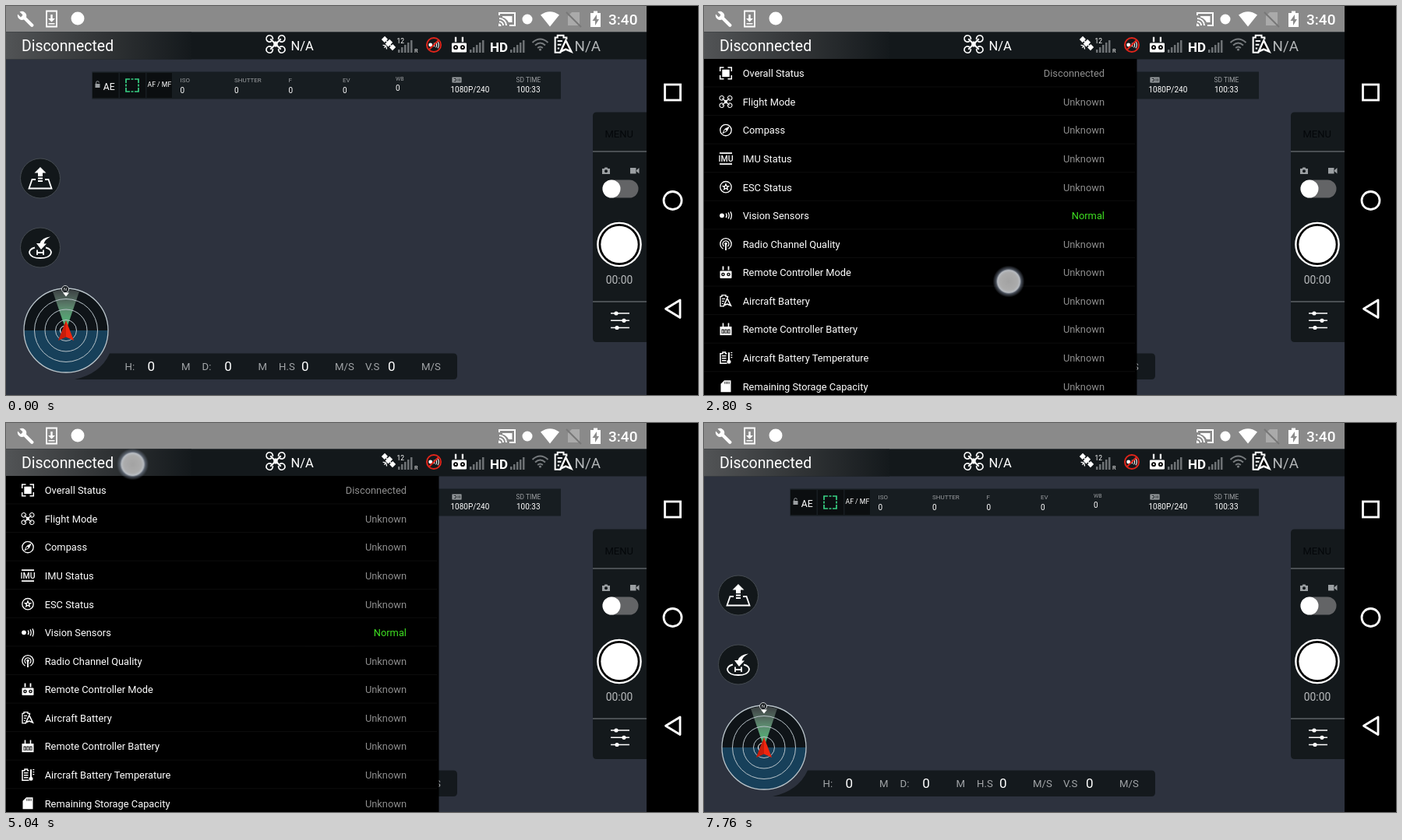
Animation of 888x500 px, one loop 8 s. Source, as an HTML page:

```html
<!DOCTYPE html>
<html lang="en">
<head>
<meta charset="utf-8">
<title>Flight status checklist</title>
<style>
html, body { margin: 0; width: 100%; height: 100%; overflow: hidden; background: #000; }
svg { display: block; width: 100vw; height: 100vh; font-family: Roboto, "Noto Sans", sans-serif; }
.s { fill: none; stroke: #fff; }
.w { fill: #fff; }
.g { fill: #9b9fa2; }
.k { fill: #000; }
.lab { font-size: 8px; fill: #9a9da0; }
.val { font-size: 10px; fill: #fff; }
.unit { font-size: 13.2px; fill: #a3a6a9; }
.num { font-size: 17px; fill: #fff; }
.row { font-size: 12.85px; fill: #fff; }
.state { text-anchor: end; fill: #8e8e8e; }
.ok { fill: #3fe022; }

/* 1% of the loop is 80 ms */
#list, #settings, #scroll, #touch, #dot { animation: 8s step-end infinite; }
#list { animation-name: list; }
#settings { animation-name: settings; }
#scroll { animation-name: scroll; }
#touch { animation-name: move; }
#dot { animation-name: press; }

@keyframes list { 0%, 65%, 100% { opacity: 0 } 18% { opacity: 1 } }
@keyframes settings { 0%, 96%, 100% { opacity: 0 } 79% { opacity: 1 } }
@keyframes scroll {
  0%, 35% { transform: translateY(0) }
  36% { transform: translateY(-12px) }
  37%, 49% { transform: translateY(-43px) }
  50% { transform: translateY(-31.5px) }
  51%, 100% { transform: translateY(0) }
}
@keyframes move {
  0% { transform: translate(152.5px, 56px) }
  35% { transform: translate(391px, 354px) }
  36% { transform: translate(392px, 330px); animation-timing-function: steps(4) }
  40% { transform: translate(398px, 65px) }
  49% { transform: translate(395px, 266px) }
  50% { transform: translate(397px, 288px); animation-timing-function: steps(4) }
  54% { transform: translate(402px, 440px) }
  63% { transform: translate(162.5px, 53px) }
  77%, 100% { transform: translate(790px, 171px) }
}
@keyframes press {
  0%, 20%, 42%, 56%, 66%, 80%, 97%, 100% { opacity: 0 }
  16%, 35%, 49%, 63%, 77%, 94% { opacity: 1 }
  18%, 40%, 54%, 65%, 79%, 96% { opacity: .76 }
  19%, 41%, 55% { opacity: .35 }
}
</style>
</head>
<body>
<svg viewBox="0 0 888 500" stroke-width="1.3">
<defs>
  <linearGradient id="head">
    <stop offset="0" stop-color="#525456"/><stop offset=".5" stop-color="#323537"/><stop offset="1" stop-color="#14191c"/>
  </linearGradient>
  <linearGradient id="beam" x1="0" y1="0" x2="0" y2="1">
    <stop offset="0" stop-color="#8b9390" stop-opacity=".35"/>
    <stop offset=".45" stop-color="#6fa583" stop-opacity=".8"/>
    <stop offset="1" stop-color="#49c878"/>
  </linearGradient>
  <radialGradient id="spot">
    <stop offset="0" stop-color="#a9a9a9" stop-opacity=".96"/>
    <stop offset=".55" stop-color="#b2b2b2" stop-opacity=".96"/>
    <stop offset=".7" stop-color="#c6cad0" stop-opacity=".92"/>
    <stop offset=".79" stop-color="#808b9e" stop-opacity=".55"/>
    <stop offset="1" stop-color="#808b9e" stop-opacity="0"/>
  </radialGradient>
  <clipPath id="view"><path d="M0 68H555.500V500H0Z"/></clipPath>

  <!-- icons on a 16 px box around the origin -->
  <g id="overall"><path class="s" stroke-width="1.500" d="M-7.300-2.500V-7.300H-2.500M2.500-7.300H7.300V-2.500M7.300 2.500V7.300H2.500M-2.500 7.300H-7.300V2.500"/><rect class="w" x="-4.700" y="-4.700" width="9.400" height="9.400"/></g>
  <g id="drone">
    <path class="s" d="M-4.500-4.500L4.500 4.500M4.500-4.500L-4.500 4.500"/>
    <path class="s" stroke-width="1.100" d="M-3.500-2.500A2.800 2.800 0 1 1-2.500-4M3.500-2.500A2.800 2.800 0 1 0 2.500-4M-3.500 2.500A2.800 2.800 0 1 0-2.500 4M3.500 2.500A2.800 2.800 0 1 1 2.500 4"/>
    <rect class="w" x="-1.800" y="-2.300" width="3.600" height="4.600" rx="1.500"/>
  </g>
  <g id="compass"><circle class="s" r="7.200"/><path class="s" stroke-width="1" d="M4-4L1.300 1.300L-4 4L-1.300-1.300Z"/><path class="w" d="M4-4L1.300 1.300L-1.300-1.300Z"/></g>
  <g id="imu"><path class="s" stroke-width="1.700" d="M-8-7H8M-8 7H8"/><text class="w" y="3.800" font-size="10.500" font-weight="500" text-anchor="middle">IMU</text></g>
  <g id="esc"><circle class="s" r="7.200"/><path class="w" d="M0-5.500L1.500-1.800L5.300-1.700L2.300.7L3.300 4.500L0 2.300L-3.300 4.500L-2.300.7L-5.300-1.700L-1.500-1.800Z"/><circle class="k" r="1.200"/></g>
  <g id="vision"><circle class="w" cx="-5" r="2.900"/><path class="s" d="M.2-2.800Q2 0 .2 2.800M3-4Q5.500 0 3 4M5.900-5Q8.900 0 5.900 5"/></g>
  <g id="radio"><path class="s" d="M-3.500 6.300A7.200 7.200 0 1 1 3.500 6.300M-2.300 3.200A4 4 0 1 1 2.300 3.200"/><path class="s" stroke-width="1.800" d="M0-1V8"/><circle class="w" r="1.700" cy="-.5"/></g>
  <g id="rc"><path class="s" stroke-width="1.800" d="M-3.500-8V-3M3.500-8V-3"/><rect class="w" x="-7.500" y="-2" width="15" height="9.500" rx="1"/><circle class="k" cx="-3.500" cy="2.500" r="2.300"/><circle class="k" cx="3.500" cy="2.500" r="2.300"/><circle class="w" cx="-3.500" cy="2.500" r=".9"/><circle class="w" cx="3.500" cy="2.500" r=".9"/></g>
  <g id="pack"><path class="s" d="M-2 6.800H-7V-5.700H-5V-7.400H0V-5.700H2.500V-4M-5-2.700H-1M-5 .3H-2M-5 3.300H-3.500"/><path class="w" d="M1.800-5L8 7.500L1.800 5L-4 7.500Z"/><path class="k" d="M1.800-1.500L4.800 4.500L1.800 3.200L-.8 4.300Z"/></g>
  <g id="rcpack"><path class="s" stroke-width="1.600" d="M-3.500-8V-3M3.500-8V-3"/><path class="w" d="M-7.500-3.500H7.500V7.500H-7.500Z"/><path class="k" d="M-5.500 0H-2.300V5.500H-5.500ZM-1.500 0H1.500V5.500H-1.500ZM2.300 0H5.500V5.500H2.300Z"/><path class="s" d="M-4 1V5M0 1V5M4 1V5"/></g>
  <g id="temp"><path class="s" stroke-width="1.500" d="M1.500-5.500H-.5V-7.200H-4V-5.500H-7V7H1.500M-5-2.500H.5M-5 .5H.5M-5 3.500H.5"/><path class="s" stroke-width="2" d="M4-7V4"/><path class="s" d="M6.300-6.500H8.300M6.300-3.500H8.300M6.300-.5H8.300"/><circle class="w" cx="4" cy="5" r="2.500"/></g>
  <g id="card"><path class="w" d="M-2-7.500H6.500V7.500H-6.500V-3Z"/><path class="s" style="stroke:#000" stroke-width="1" d="M-1-6V-3M1.500-6V-3M4-6V-3"/></g>
  <g id="gimbal"><path class="s" stroke-width="1.800" d="M-7-7H7"/><rect class="w" x="-6.500" y="-4.500" width="13" height="12" rx="1"/><circle class="k" cy="2" r="4"/><circle class="w" cy="2" r="2"/></g>
  <path id="bars" fill="#6d7174" d="M0 0V-4H2.500V0ZM4 0V-7H6.500V0ZM8 0V-10H10.500V0ZM12 0V-13H14.500V0ZM16 0V-16H18.500V0Z"/>
</defs>

<rect width="888" height="500"/>
<rect width="822" height="500" fill="#2d323e"/>

<!-- system bar -->
<rect width="822" height="33.500" fill="#8a8a8a"/>
<path class="w" d="M35 23.500L26 14.500A6 6 0 0 0 17.500 7.500L21.500 11.500L19 14.500L15 10.500A6 6 0 0 0 23 17.500L32 26.500Q33.500 27.500 35 26Q36.300 24.700 35 23.500Z"/>
<path class="s" stroke-width="1.800" d="M52 6.500H65V26.500H52Z"/>
<path class="w" d="M57.300 11H59.700V16H63L58.500 20.500L54 16H57.300ZM54.500 22H62.500V23.500H54.500Z"/>
<circle class="w" cx="92" cy="16" r="8.500"/>
<path class="s" stroke-width="2" d="M633 12V9H653V25H646M633 16A9 9 0 0 1 642 25M633 20A5 5 0 0 1 638 25"/>
<path class="w" d="M632 22.500A3.500 3.500 0 0 1 635.500 26H632ZM637 13H649.500V21H645Q642 15.500 637 14.500Z"/>
<circle class="w" cx="669" cy="17" r="6.500"/>
<path class="w" d="M686 11.500Q698 3 710 11.500L698 26.500Z"/>
<path fill="#aaa" d="M726 8H736V25H721V13Z"/>
<path d="M719 8L738 27" stroke="#777" stroke-width="2"/>
<path class="w" d="M750 9H754V6.500H759V9H763V27H750Z"/>
<path fill="#8a8a8a" d="M758 11L752.500 19H756V25L761 17H758Z"/>
<text class="w" x="773" y="23.800" font-size="19" font-weight="500">3:40</text>

<!-- aircraft bar -->
<rect y="33.500" width="822" height="35" fill="#13181b"/>
<rect y="33.500" width="238" height="35" fill="url(#head)"/>
<text class="w" x="20" y="58.300" font-size="19.400">Disconnected</text>
<use href="#drone" transform="translate(346 49) scale(1.500)"/>
<text class="w" x="365.500" y="57.300" font-size="16.500">N/A</text>
<g transform="translate(491 48) rotate(45)">
  <path class="w" d="M-10-3H-4.500V3H-10ZM4.500-3H10V3H4.500ZM-2.800-4.500H2.800V3.500H-2.800Z"/>
  <path class="s" d="M-5 0H5M-3.500 7Q0 3.500 3.500 7M0 4V8"/>
</g>
<text class="w" x="501.500" y="47.500" font-size="8.500">12</text>
<use href="#bars" x="503" y="60"/>
<text class="w" x="524" y="60" font-size="7.500">R</text>
<use href="#vision" transform="translate(549 50) scale(.850)"/>
<circle cx="549" cy="50" r="9" fill="none" stroke="#e0251b" stroke-width="2"/>
<path d="M555.500 43.500L542.500 56.500" stroke="#e0251b" stroke-width="2"/>
<use href="#rc" transform="translate(581.500 50) scale(1.270)"/>
<use href="#bars" x="595" y="60"/>
<text class="w" x="621" y="59.200" font-size="17" font-weight="700">HD</text>
<use href="#bars" x="647" y="60"/>
<g fill="none" stroke="#777b7e" stroke-width="2"><path d="M675.500 47Q685.500 38 695.500 47M679 50.500Q685.500 44.500 692 50.500M682.200 54Q685.500 51 688.800 54"/></g>
<circle cx="685.500" cy="56" r="1.600" fill="#777b7e"/>
<use href="#pack" transform="translate(715.500 49.300) scale(1.550)"/>
<text x="729.500" y="58" font-size="18.800" fill="#b4b7b9">N/A</text>

<!-- camera readings -->
<rect x="110.500" y="84.500" width="601.500" height="35" fill="#171d21"/>
<path fill="#0b0e10" d="M111 86H144.500V118H111ZM146 86H179V118H146ZM180.500 86H213V118H180.500Z"/>
<path class="g" d="M114.500 100H120.500V105H114.500Z"/><path d="M115.700 100V98.500A1.800 1.800 0 0 1 119.300 98.500" fill="none" stroke="#9b9fa2" stroke-width="1"/>
<text class="w" x="124.800" y="108.300" font-size="12.200">AE</text>
<path d="M154 99V94H159M165 94H170V99M170 105V110H165M159 110H154V105M160.500 94H163.500M160.500 110H163.500M154 100.500V103.500M170 100.500V103.500" fill="none" stroke="#38cf83" stroke-width="1.700"/>
<text class="w" x="181.500" y="104.200" font-size="8.700">AF / MF</text>
<g class="lab">
  <text x="223.500" y="98">ISO</text><text x="293" y="98">SHUTTER</text><text x="362.500" y="98">F</text>
  <text x="432" y="98">EV</text><text x="500" y="96.300" font-size="7">WB</text><text x="654.500" y="98" font-size="8.400">SD TIME</text>
</g>
<g class="val">
  <text x="223.500" y="112">0</text><text x="293" y="112">0</text><text x="362.500" y="112">0</text>
  <text x="432" y="112">0</text><text x="500" y="109">0</text>
  <text x="570.500" y="111.300">1080P/240</text><text x="655" y="111.300">100:33</text>
</g>
<rect class="g" x="572.500" y="91.500" width="12" height="7"/>
<path d="M574.500 93.500H577.500V96.500H574.500M580 93V97M582.300 93V97" fill="none" stroke="#22282c" stroke-width="1"/>

<!-- flight buttons -->
<g fill="#12171a" stroke="#454b51" stroke-width="1"><circle cx="44" cy="221.500" r="25.500"/><circle cx="44" cy="310.500" r="25.500"/></g>
<path class="w" d="M44 207L51.500 214.500H47V219H41V214.500H36.500ZM41 220.500H47V222.500H41ZM41 224H47V226H41Z"/>
<path class="s" stroke-width="1.800" d="M38 223H33.500L29.500 234.500H58.500L54.500 223H50"/>
<path class="w" d="M57 296.500Q46 297.500 43.500 305H39L45 313L52 305.500H48.500Q50 300 57 296.500Z"/>
<path class="s" stroke-width="1.800" d="M37 310.500C26 313 28 324 44 324S62 313 51 310.500M40 313.500V320M48 313.500V320M40 317H48"/>

<!-- telemetry -->
<path fill="#14191d" d="M133 446.500H574Q579 446.500 579 451.500V475Q579 480 574 480H88Q121 473 133 446.500Z"/>
<g class="unit">
  <text x="152.500" y="468">H:</text><text x="225" y="468">M</text><text x="251.500" y="468">D:</text><text x="323.500" y="468">M</text>
  <text x="350" y="468">H.S</text><text x="422" y="468">M/S</text><text x="461" y="468">V.S</text><text x="533" y="468">M/S</text>
</g>
<g class="num"><text x="181.500" y="468.500">0</text><text x="280.300" y="468.500">0</text><text x="379" y="468.500">0</text><text x="490" y="468.500">0</text></g>

<!-- radar -->
<g transform="translate(77 417)" stroke-width="1">
  <circle r="54" fill="#0f1418"/>
  <path fill="#17405a" d="M-54 0A54 54 0 0 0 54 0Z"/>
  <path fill="url(#beam)" d="M0 0L-17-50Q0-55 17-50Z"/>
  <g fill="none" stroke="#b9c4ca"><circle r="13.500"/><circle r="27"/><circle r="40.500"/><circle r="54" stroke-width="1.300"/></g>
  <circle class="s" cx="-2" r="5.500"/>
  <path fill="#f0260f" d="M0-13L10 13L0 8.500Z"/><path fill="#c81d0b" d="M0-13L-10 13L0 8.500Z"/>
  <circle cx="-1" cy="-53" r="4.500" fill="#14191d" stroke="#d0d4d6"/>
  <text class="w" x="-1" y="-51" font-size="5.500" text-anchor="middle">N</text>
  <path class="w" d="M-4-48.500H4L0-43.500Z"/>
</g>

<!-- camera controls -->
<path fill="#14191c" d="M822 136.500H758Q753 136.500 753 141.500V427Q753 432 758 432H822Z"/>
<path d="M753 187H822M753 380H822" stroke="#5c6165" stroke-width="1.600"/>
<text x="768.500" y="168.800" font-size="13" fill="#04070a">MENU</text>
<path class="g" d="M765 209H767.500L768.500 207.500H771.500L772.500 209H775V216H765ZM801 208H808.500V215.500H801ZM809 211L812.500 208V215.500L809 212.500Z"/>
<circle cx="770" cy="212.300" r="2" fill="#14191c"/>
<rect x="765.500" y="223.500" width="46" height="23" rx="11.500" fill="#636466"/>
<circle class="w" cx="777" cy="235" r="11.500"/>
<circle cx="787" cy="306.500" r="27.600" fill="#000" stroke="#fff" stroke-width="2.400"/>
<circle class="w" cx="787" cy="306.500" r="23.700"/>
<text x="769.800" y="357" font-size="13.800" fill="#b9bbbd">00:00</text>
<path class="s" stroke-width="1.600" d="M776 395H800M776 404.300H800M776 413.500H800"/>
<g class="w"><circle cx="783" cy="395" r="2.600"/><circle cx="793" cy="404.300" r="2.600"/><circle cx="784" cy="413.500" r="2.600"/></g>

<rect id="settings" x="503" y="136" width="249.500" height="364" fill="#0d1114"/>

<!-- checklist -->
<g id="list" clip-path="url(#view)">
  <rect y="68" width="555.500" height="432"/>
  <g id="scroll"></g>
</g>

<!-- navigation -->
<g fill="none" stroke="#fff" stroke-width="2.800">
  <rect x="845.500" y="101" width="20" height="20"/>
  <circle cx="855.500" cy="250" r="11.500"/>
  <path d="M865 378V400.500L846.500 389.300Z" stroke-linejoin="round"/>
</g>

<g id="touch"><circle id="dot" r="20.500" fill="url(#spot)"/></g>
</svg>
<script>
const items = [
  ["overall", "Overall Status", "Disconnected"],
  ["drone", "Flight Mode"],
  ["compass", "Compass"],
  ["imu", "IMU Status"],
  ["esc", "ESC Status"],
  ["vision", "Vision Sensors", "Normal"],
  ["radio", "Radio Channel Quality"],
  ["rc", "Remote Controller Mode"],
  ["pack", "Aircraft Battery"],
  ["rcpack", "Remote Controller Battery"],
  ["temp", "Aircraft Battery Temperature"],
  ["card", "Remaining Storage Capacity"],
  ["gimbal", "Gimbal Status"]
];
document.getElementById("scroll").innerHTML = items.map(([icon, name, state = "Unknown"], i) => {
  const y = 86.4 + i * 36.58;
  const tone = state === "Normal" ? "state ok" : "state";
  return `<g class="row" transform="translate(0 ${y})">
    <use href="#${icon}" x="28"/>
    <text x="49.700" y="4.800">${name}</text>
    <text class="${tone}" x="514" y="4.800">${state}</text>
    <path d="M0 17.600H553" stroke="#171717" stroke-width=".6"/>
  </g>`;
}).join("");
</script>
</body>
</html>
```
